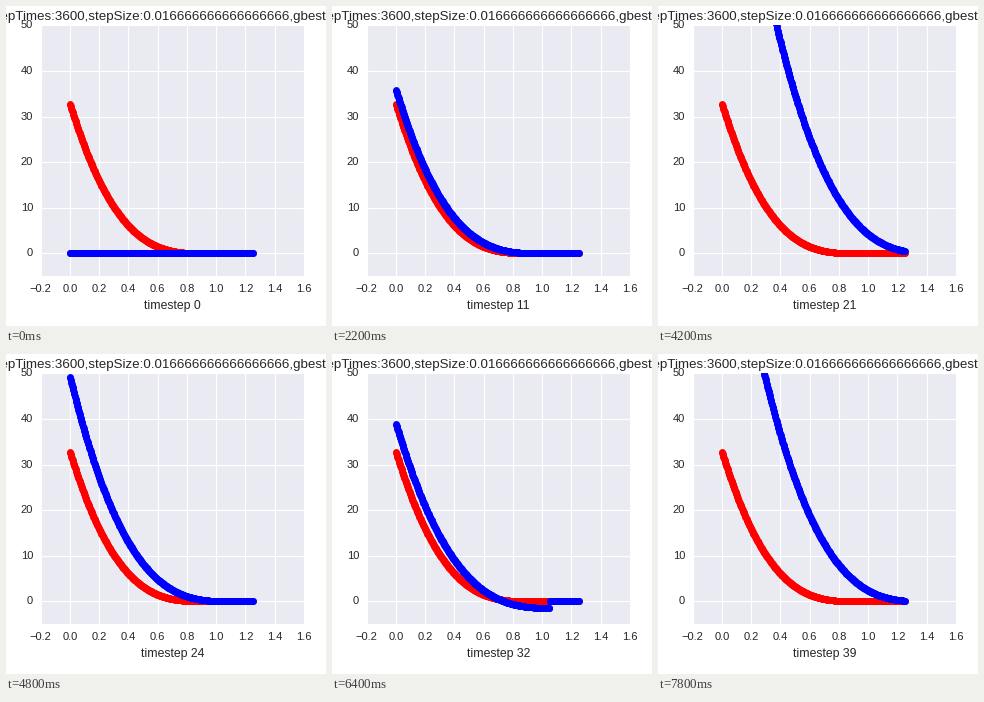
A matplotlib script that plays this animation: 320x320 px, repeating every 8000 ms.

```python
import numpy as np
import matplotlib.pyplot as plt
from matplotlib.animation import FuncAnimation

SIZE, DPI = 320, 80
FRAMES, INTERVAL = 40, 200
LEFT, RIGHT, TOP, BOTTOM = 34.8, 297.8, 19.4, 270
INK = "#262626"

# Step -> position of the blue front, swinging around the red one.
FRONT = {1: 1.3, 7: 0.282, 14: 1.455, 21: 1.488, 28: 0.517, 32: 1.105, 39: 1.405}

plt.rcParams.update({
    "font.family": "Liberation Sans",
    "text.color": INK,
    "ytick.alignment": "center",
})

x = np.linspace(0, 1.25, 500)


def eased(step, keys):
    """Cosine easing between neighbouring keys."""
    steps, values = list(keys), list(keys.values())
    pos = np.interp(step, steps, range(len(steps)))
    i = min(int(pos), len(steps) - 2)
    mix = (1 - np.cos(np.pi * (pos - i))) / 2
    return values[i] + (values[i + 1] - values[i]) * mix


def cubic(front, steep, dip=0.0):
    """Cubic decay towards the front, flat zero beyond it."""
    y = steep * np.maximum(front - x, 0) ** 3 - dip
    return np.where(x <= front - 0.036 * dip, y, 0)


def profile(step):
    if step == 0:
        return np.zeros_like(x)
    bump = np.exp(-((step - 32) / 3.2) ** 2)
    return cubic(eased(step, FRONT), 36 - 6 * bump, 1.5 * bump)


def label(px, py, text, size, ha):
    return fig.text(px / SIZE, 1 - py / SIZE, text, fontsize=size,
                    ha=ha, va="baseline")


fig = plt.figure(figsize=(SIZE / DPI, SIZE / DPI), dpi=DPI, facecolor="white")
ax = fig.add_axes([LEFT / SIZE, 1 - BOTTOM / SIZE,
                   (RIGHT - LEFT) / SIZE, (BOTTOM - TOP) / SIZE],
                  facecolor="#EAEAF2")
ax.set(xlim=(-0.2, 1.6), ylim=(-5, 50),
       xticks=np.arange(-1, 9) * 0.2, yticks=range(0, 51, 10))
ax.xaxis.set_major_formatter("{x:.1f}")
ax.set_axisbelow(True)
ax.grid(color="white", lw=1)
ax.tick_params(length=0, pad=7, labelsize=10, labelcolor=INK)
for spine in ax.spines.values():
    spine.set_visible(False)

dots = dict(ls="", marker="o", ms=6.2, mew=0)
ax.plot(x, cubic(0.928, 41), color="red", **dots)
moving, = ax.plot(x, profile(0), color="blue", **dots)

label(-15.6, 14.4, f"stepTimes:3600,stepSize:{1 / 60},gbest", 12, "left")
caption = label((LEFT + RIGHT) / 2, 303, "timestep 0", 11, "center")


def update(step):
    moving.set_ydata(profile(step))
    caption.set_text(f"timestep {step}")
    return moving, caption


anim = FuncAnimation(fig, update, frames=FRAMES, interval=INTERVAL,
                     repeat=True, repeat_delay=0)
plt.show()
```
